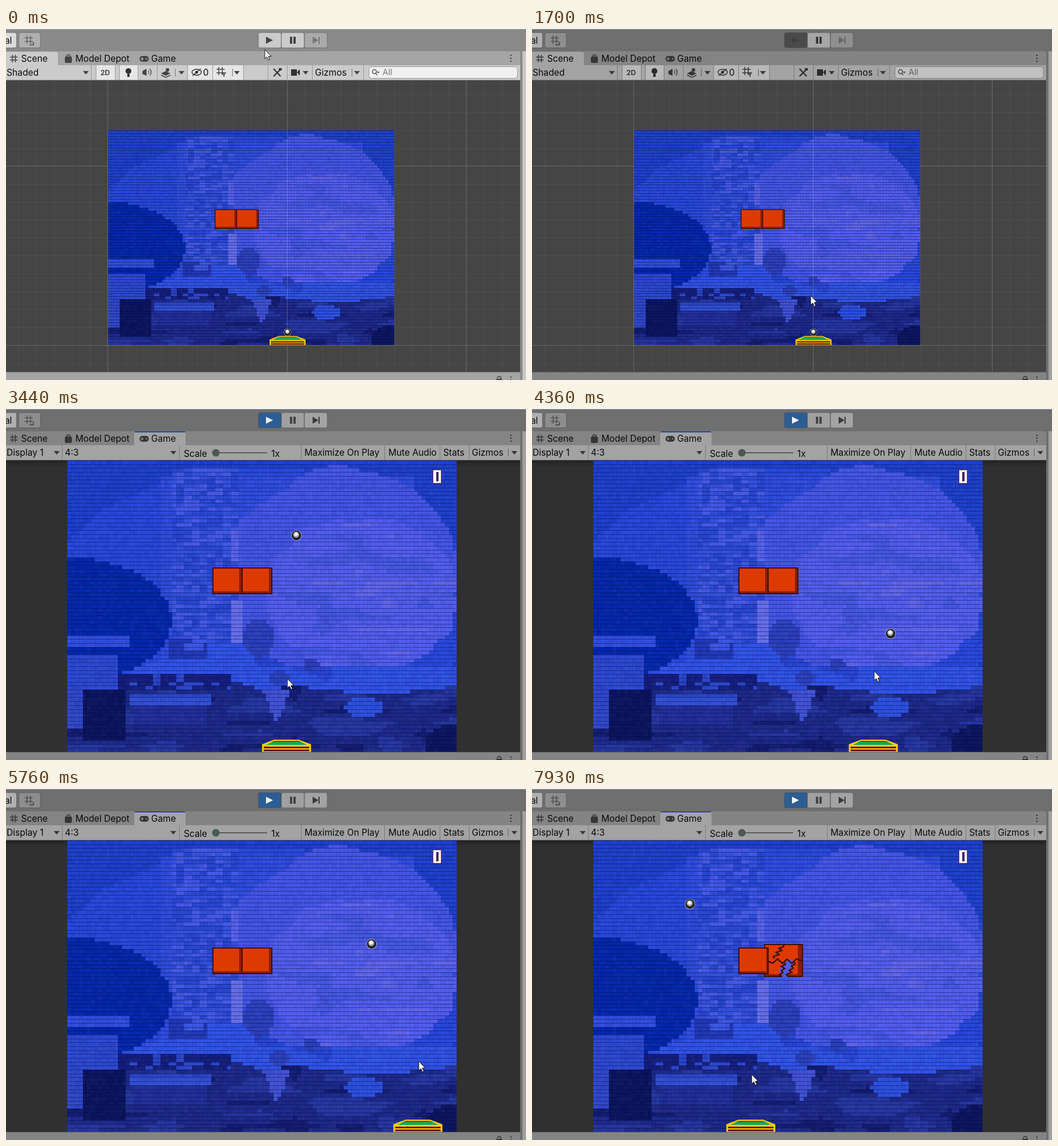
An HTML page with a canvas for the animation above (8000 ms loop, 892 by 605 pixels).

```html
<!DOCTYPE html>
<html lang="en">
<head>
<meta charset="utf-8">
<title>Brick game in the editor</title>
<style>
html, body { margin: 0; width: 100%; height: 100%; overflow: hidden; background: #454545; }
canvas { display: block; }
</style>
</head>
<body>
<canvas id="stage" width="892" height="605"></canvas>
<script>
const LOOP = 8000, STEP = 77.6, PHASE = 4360;
const PRESS = 320, START = 2260, GRAB = 2800, LAUNCH = 3010, HIT = 6283;
const VIEW = { x: 105, y: 90, w: 668, h: 501 };
const COLS = 100, ROWS = 75;
const c = document.getElementById('stage').getContext('2d');
let g = c;

// Drawing helpers
function rect(x, y, w, h, fill) { g.fillStyle = fill; g.fillRect(x, y, w, h); }
function round(x, y, w, h, r, fill, edge) {
  g.beginPath(); g.roundRect(x, y, w, h, r);
  g.fillStyle = fill; g.fill();
  if (edge) { g.strokeStyle = edge; g.lineWidth = 1; g.stroke(); }
}
function path(pts, close) {
  g.beginPath();
  for (let i = 0; i < pts.length; i += 2) g.lineTo(pts[i], pts[i + 1]);
  if (close) g.closePath();
}
function poly(fill, ...pts) { path(pts, true); g.fillStyle = fill; g.fill(); }
function line(color, width, ...pts) {
  path(pts); g.strokeStyle = color; g.lineWidth = width; g.stroke();
}
function arc(color, width, x, y, r, from = 0, to = 7, ry = r) {
  g.beginPath(); g.ellipse(x, y, r, ry, 0, from, to);
  g.strokeStyle = color; g.lineWidth = width; g.stroke();
}
function disc(x, y, r, fill) {
  g.beginPath(); g.arc(x, y, r, 0, 7); g.fillStyle = fill; g.fill();
}
function text(s, x, y, color = '#0b0b0b', font = '15.3px') {
  g.font = font + ' Inter, Roboto, sans-serif';
  g.fillStyle = color; g.fillText(s, x, y);
}

// Maths helpers
const clamp = (v, lo, hi) => Math.min(hi, Math.max(lo, v));
const mix = (a, b, k) => a + (b - a) * k;
function fold(v, lo, hi) {
  const span = hi - lo, m = (((v - lo) % (2 * span)) + 2 * span) % (2 * span);
  return lo + Math.min(m, 2 * span - m);
}
function noise(x, y) {
  const n = Math.sin(x * 127.1 + y * 311.7) * 43758.5453;
  return n - Math.floor(n);
}
function smooth(x, y) {
  const i = Math.floor(x), j = Math.floor(y), u = x - i, v = y - j;
  return mix(mix(noise(i, j), noise(i + 1, j), u), mix(noise(i, j + 1), noise(i + 1, j + 1), u), v) - .5;
}
function at(track, t) {
  let i = 1;
  while (i < track.length - 1 && track[i][0] < t) i++;
  const a = track[i - 1], b = track[i], k = clamp((t - a[0]) / (b[0] - a[0]), 0, 1);
  return a.map((v, n) => mix(v, b[n], k));
}

// Motion: time, x, y of the pointer in the editor, then time, x in the game
const editorHand = [
  [90, 444, 37], [240, 450, 20], [390, 450, 20], [770, 428, 457], [1090, 428, 457], [1160, 437, 460],
  [1320, 437, 460], [1640, 478, 460], [2250, 479, 459], [2570, 458, 480]
];
const gameHand = [
  [2900, 458], [3050, 444], [3300, 452], [3820, 576], [4360, 587], [4670, 600], [5250, 732],
  [5530, 732], [5757, 708], [6370, 537], [6843, 244], [7136, 150], [7300, 150], [7930, 377]
];
function hand(t) {
  if (t < GRAB) return at(editorHand, t).slice(1);
  return [at(gameHand, t)[1], 474 - 22 * Math.cos((t - 4500) / 2890 * Math.PI)];
}

// Ball after each hit: time, x, y, speed in px per ms; walls fold the path
const hits = [
  [LAUNCH, 450, 562, .115, -.819], [4145, 580, 562, .163, -.81], [5290, 762, 562, -.289, -.63],
  [HIT, 475, 262, -.402, -.734], [7136, 132, 562, -.218, -.71]
];
function ballAt(t) {
  const [t0, x, y, vx, vy] = hits.findLast(h => h[0] <= t);
  return [fold(x + vx * (t - t0), 115, 764), fold(y + vy * (t - t0), 99, 562)];
}

// Backdrop: a night launch site, one colour per small brick
const inside = (x, y, cx, cy, rx, ry) => ((x - cx) / rx) ** 2 + ((y - cy) / ry) ** 2 < 1;
const box = (x, y, l, t, r, b) => x > l && x < r && y > t && y < b;

function ground(x, y, n) {
  if (box(x, y, 105, 425, 193, 484)) return '#2c48d0';
  if (box(x, y, 105, 485, 132, 550)) return '#2f47c8';
  if (box(x, y, 132, 485, 205, 570)) return '#0a155c';
  if (box(x, y, 213, 488, 353, 512)) return y < 496 ? '#2b45c8' : '#3150d4';
  if (box(x, y, 220, 512, 345, 545)) return '#232f98';
  if (y > 487 && Math.abs(x - 464) < (540 - y) * .46) return '#4152d4';
  if (inside(x, y, 615, 514, 33, 17)) return '#2c50de';
  if (inside(x, y, 773, 575, 55, 32)) return '#0c165e';
  if (box(x, y, 193, 455, 385, 482)) return noise(Math.floor(x / 14), Math.floor(y / 9)) > .75 ? '#2c46ca' : '#141f7c';
  return n > .16 ? '#26369e' : n < -.2 ? '#121c6e' : '#1d2988';
}
function tone(x, y) {
  const n = smooth(x / 55, y / 20), w = n * 22;
  const floor = x < 385 ? 455 : 486 + 6 * Math.sin(x / 45) - clamp((440 - x) * .4, 0, 22);
  const ridge = x < 345 ? 434 + clamp((260 - x) * .35, 0, 25) : 404 + clamp((x - 400) * .45, 0, 40);
  if (box(x, y, 105, 390, 212, 411)) return '#2f4edc';
  if (y > floor || box(x, y, 105, 425, 193, 460)) return ground(x, y, n);
  if (inside(x, y, 433, 396, 27, 32)) return '#2d41bc';
  if (inside(x, y, 470, 463, 16, 13) || inside(x, y, 524, 442, 13, 11)) return '#2c42bc';
  if (box(x, y, 386, 330, 404, 385) || box(x, y, 386, 385, 412, 404)) return '#666ee8';
  if (box(x, y, 276, 398, 346, 432)) return noise(Math.floor(x / 14), Math.floor(y / 14)) > .6 ? '#3c56e0' : '#2138b4';
  if (y > ridge && x > 193) return n > .3 ? '#2846d2' : '#3053e4';
  if (inside(x, y, 105, 364, 179, 107)) return '#0427aa';
  if (box(x, y, 386, 210, 400, 262)) return '#5863ea';
  if (box(x, y, 286, 104, 398, 434)) {
    const k = noise(Math.floor(x / 13.4), Math.floor(y / 6.7));
    return k > .75 ? '#4459e4' : k > .4 ? '#3350dc' : '#2846d0';
  }
  if (inside(x, y, 545, 365, 9, 9)) return '#4453da';
  if (inside(x, y, 610 + w, 320 + w, 165, 132)) return n > .27 ? '#6064e8' : n < -.24 ? '#4658e2' : '#525dec';
  if (inside(x, y, 580 + w, 288 + w, 198, 182)) return '#4456e4';
  if (x > 262 && y > 120 && x < 700) return '#2f4ddc';
  return inside(x, y, 440 + w, 330, 372, 228) ? '#2748d8' : '#1e40ca';
}
function backdrop(w, h) {
  const cv = document.createElement('canvas'), cw = w / COLS, ch = h / ROWS;
  cv.width = w; cv.height = h;
  g = cv.getContext('2d');
  for (let r = 0; r < ROWS; r++) {
    const y = Math.round(r * ch);
    for (let k = 0; k < COLS; k++) {
      const x = Math.round(k * cw), n = noise(k, r + 40) - .5;
      rect(x, y, cw + 1, ch + 1, tone(VIEW.x + (k + .5) * 6.68, VIEW.y + (r + .5) * 6.68));
      rect(x, y, cw + 1, ch + 1, n > 0 ? `rgba(120,130,255,${n * .1})` : `rgba(0,5,80,${-n * .12})`);
      rect(x, y, 1, ch + 1, 'rgba(0,0,50,.08)');
    }
    rect(0, y, w, 1, 'rgba(4,8,60,.45)');
  }
  g = c;
  return cv;
}
const wide = backdrop(VIEW.w, VIEW.h), tight = backdrop(491, 369);

// Game objects, in game view coordinates
const INK = '#3f0f04';
function brick(x, y, w, h, side = 4) {
  rect(x, y, w, h, INK);
  rect(x + 2, y + 2, w - 4, h - 4, '#8a1e04');
  rect(x + 2, y + 2, w - 4 - side, h - 7, '#dd3a02');
}
function crack(x0, y0, x1, y1, seed) {
  const pts = [], n = 7;
  for (let i = 0; i <= n; i++) {
    const k = i / n, off = i % n ? (i % 2 ? 1 : -1) * (1.5 + 3 * noise(i, seed)) : 0;
    const along = Math.abs(x1 - x0) > Math.abs(y1 - y0);
    pts.push(mix(x0, x1, k) + (along ? 0 : off), mix(y0, y1, k) + (along ? off : 0));
  }
  line(INK, 2.4, ...pts);
}
function broken() {
  brick(398, 268, 67, 57, 7);
  poly('#4e5ce6', 424, 312, 433, 301, 442, 294, 450, 299, 443, 310, 438, 325, 430, 325);
  crack(432, 269, 416, 293, 1);
  crack(405, 298, 462, 297, 2);
  crack(433, 300, 427, 324, 3);
  crack(450, 299, 439, 324, 4);
}
function paddle(x) {
  const slab = (fill, top, y0, base, y1) => poly(fill, x - top, y0, x + top, y0, x + base, y1, x - base, y1);
  slab('#ffce08', 21, 570, 42, 578);
  rect(x - 42, 578, 84, 13, '#ffce08');
  slab('#8c3c04', 20, 572, 26, 574);
  slab('#10a95a', 25, 574, 35, 579);
  for (const y of [582, 587]) rect(x - 39, y, 78, 3, '#68100c');
}
function ball(x, y) {
  disc(x, y, 8.8, '#c8c8cc');
  const shade = g.createRadialGradient(x - 1, y - 3, 1, x, y, 8);
  ['#fff', '#e6e6e6', '#8c8c8c', '#1c1c1c', '#000'].forEach((s, i) => shade.addColorStop(i / 4, s));
  disc(x, y, 8, shade);
}
function pieces(px, bx, by, cracked) {
  if (cracked) broken(); else brick(404, 274, 53, 46);
  brick(354, 274, 52, 46, cracked ? 2 : 4);
  paddle(px);
  ball(bx, by);
}

// Editor window
function arrow(...xs) { for (const x of xs) poly('#444', x - 5, 74, x + 5, 74, x, 80); }
function button(x, w, fill) { round(x, 8, w, 26, 3, fill, 'rgba(70,70,70,.45)'); }
function hash(x, y, s, color) {
  for (const d of [0, s]) {
    line(color, 1.5, x + d, y - 4, x + d, y + s + 4);
    line(color, 1.5, x - 4, y + d, x + s + 4, y + d);
  }
}
function dots(x, y) { for (let i = 0; i < 3; i++) rect(x - 1, y + i * 5, 2, 2, '#333'); }
function bars(color, y, h, ...xs) { for (const x of xs) rect(x, y, 1, h, color); }
const seps = (...xs) => bars('#999', 64, 26, ...xs);
const ticks = (...xs) => bars('#777', 70, 13, ...xs);

function chrome(game) {
  rect(0, 2, 892, 38, '#8a8a8a');
  rect(0, 40, 892, 24, '#a5a5a5');
  button(-6, 24, '#dcdcdc');
  text('al', -2, 27);
  button(22, 37, '#b0b0b0');
  hash(36, 17, 6, '#666');
  line('#666', 2, 40, 29, 47, 29, 47, 24);
  round(game ? 220 : -4, 41, game ? 88 : 93, 26, [4, 4, 0, 0], '#cbcbcb');
  if (game) rect(221, 40, 86, 2, '#3c58b8');
  rect(0, 64, 882, 26, '#cbcbcb');
  hash(11, 50, 5, '#444');
  text('Scene', 26, 58);
  round(101, 49, 12, 11, 2, '#444');
  arc('#444', 1.5, 107, 49, 3, Math.PI);
  text('Model Depot', 119, 58);
  round(229, 48, 16, 10, 5, '#444');
  line('#bbb', 1.3, 231, 53, 236, 53);
  line('#bbb', 1.3, 233.5, 50.5, 233.5, 55.5);
  rect(240, 52, 2, 2, '#bbb');
  text('Game', 249, 58);
  dots(866, 46);
  if (game) gameBar(); else sceneBar();
  rect(0, 89, 882, 1, '#8d8d8d');
  rect(882, 40, 4, 565, '#8a8a8a');
  rect(886, 40, 6, 565, '#c8c8c8');
  rect(0, 591, 882, 14, '#a5a5a5');
  rect(0, 591, 882, 1, '#777');
  arc('#444', 1.5, 846, 602, 3, Math.PI);
  rect(841, 603, 10, 2, '#444');
  dots(866, 599);
}
function sceneBar() {
  for (const [x, w] of [[155, 32], [195, 31], [312, 42], [355, 52]]) rect(x, 64, w, 26, '#e6e6e6');
  seps(146, 154, 187, 194, 226, 259, 311, 354, 407, 449, 482, 525, 613);
  ticks(290, 388, 593);
  arrow(137, 301, 396, 514, 602);
  text('Shaded', 1, 82);
  text('2D', 162, 81, '#333', '600 12px');
  disc(210, 74, 5, '#333');
  rect(208, 79, 4, 5, '#333');
  poly('#444', 234, 74, 241, 70, 241, 82, 234, 79);
  for (const r of [4, 8]) arc('#444', 1.3, 241, 76, r, -.8, .8);
  poly('#444', 266, 78, 274, 74, 282, 78, 274, 82);
  line('#444', 1.5, 266, 81, 274, 85, 282, 81);
  disc(277, 72, 3, '#444');
  arc('#333', 1.4, 327, 76, 8, 0, 7, 5);
  disc(327, 76, 2.5, '#333');
  line('#333', 1.5, 320, 82, 334, 70);
  text('0', 338, 82);
  hash(365, 71, 6, '#444');
  text('Y', 370, 84, '#333', '600 11px');
  line('#333', 2.2, 459, 70, 471, 83);
  line('#333', 2.2, 471, 71, 459, 83);
  rect(468, 69, 5, 4, '#333');
  rect(489, 71, 10, 11, '#333');
  poly('#333', 499, 76, 504, 71, 504, 82);
  text('Gizmos', 530, 82);
  round(622.5, 66.5, 255, 20, 5, '#f0f0f0', '#999');
  arc('#555', 1.4, 632, 75, 3.5);
  line('#555', 1.4, 634, 78, 637, 81);
  poly('#555', 636, 75, 641, 75, 638.5, 78);
  text('All', 646, 81, '#777', '14px');
}
function gameBar() {
  seps(96, 297, 506, 649, 744, 794);
  ticks(861);
  arrow(87, 287, 872);
  rect(360, 76, 88, 2, '#737373');
  disc(360, 77, 6.5, '#5d6f67');
  text('Scale', 305, 84);
  text('1x', 455, 84);
  const labels = { 'Display 1': 1, '4:3': 101, 'Maximize On Play': 512, 'Mute Audio': 656, 'Stats': 750, 'Gizmos': 799 };
  for (const s in labels) text(s, labels[s], 82);
}
function transport(pressed, game) {
  const fills = game ? ['#2c5d94', '#a0a0a0', '#a3a3a3'] : pressed ? ['#4b4b4b', '#a6a6a6', '#8f8f8f'] : ['#cbcbcb', '#cbcbcb', '#aaa'];
  const ink = game ? ['#f4f4f4', '#444', '#3a3a3a'] : pressed ? ['#414141', '#383838', '#666'] : ['#444', '#444', '#777'];
  fills.forEach((f, i) => button(433 + i * 39.5, 39, f));
  poly(ink[0], 446, 15, 458, 21, 446, 27);
  for (const x of [487, 493]) rect(x, 15, 4, 12, ink[1]);
  poly(ink[2], 526, 15, 536, 21, 526, 27);
  rect(536, 15, 2, 12, ink[2]);
}

// Views
function gridLines() {
  for (let i = -6; i < 24; i++) {
    const x = 174.3 + i * 30.75, y = 237.3 + i * 30.75;
    const tone = `rgba(190,190,190,${i % 10 ? .07 : .3})`;
    if (x > 0 && x < 882) rect(Math.round(x), 90, 1, 501, tone);
    if (y > 90 && y < 591) rect(0, Math.round(y), 882, 1, tone);
  }
}
function sceneView() {
  rect(0, 90, 882, 501, '#454545');
  gridLines();
  g.drawImage(tight, 175, 176);
  rect(482, 176, 1, 369, 'rgba(180,190,210,.3)');
  g.save();
  g.translate(175, 176); g.scale(.735, .7365); g.translate(-VIEW.x, -VIEW.y);
  pieces(524, 524, 561, false);
  g.restore();
}
function gameView(t, mx) {
  rect(0, 90, 882, 501, '#303030');
  const fade = g.createLinearGradient(0, 90, 0, 100);
  fade.addColorStop(0, '#222'); fade.addColorStop(1, '#303030');
  rect(0, 90, 882, 10, fade);
  g.save();
  g.beginPath(); g.rect(VIEW.x, VIEW.y, VIEW.w, VIEW.h); g.clip();
  g.drawImage(wide, VIEW.x, VIEW.y);
  const px = t < GRAB ? 468.5 : clamp(mx - 1.5, 147, 731);
  const [bx, by] = t < LAUNCH ? [px, 562] : ballAt(t);
  pieces(px, bx, by, t >= HIT);
  rect(732, 106, 15, 24, '#722c48');
  rect(733, 107, 13, 22, '#fff');
  rect(738, 110, 4, 16, '#43236e');
  g.restore();
}
function cursor(x, y) {
  g.save();
  g.translate(x, y);
  path([0, 0, 0, 16, 3.7, 12.7, 6.3, 18.5, 8.7, 17.4, 6.2, 11.8, 11, 11.4], true);
  g.fillStyle = '#fff'; g.fill();
  g.strokeStyle = '#111'; g.lineWidth = 1; g.stroke();
  g.restore();
}

function draw(now) {
  const clock = now % LOOP;
  const t = PHASE + Math.floor((clock - PHASE) / STEP + .1) * STEP;
  const game = clock >= START, pressed = t >= PRESS;
  const [mx, my] = hand(t);
  rect(0, 0, 892, 2, '#f0f0f0');
  chrome(game);
  if (pressed) rect(0, 2, 892, 603, 'rgba(0,0,0,.2)');
  transport(pressed, game);
  if (game) gameView(t, mx); else sceneView();
  cursor(mx, my);
}
const begin = performance.now();
function tick() {
  draw(performance.now() - begin);
  requestAnimationFrame(tick);
}
tick();
</script>
</body>
</html>
```
